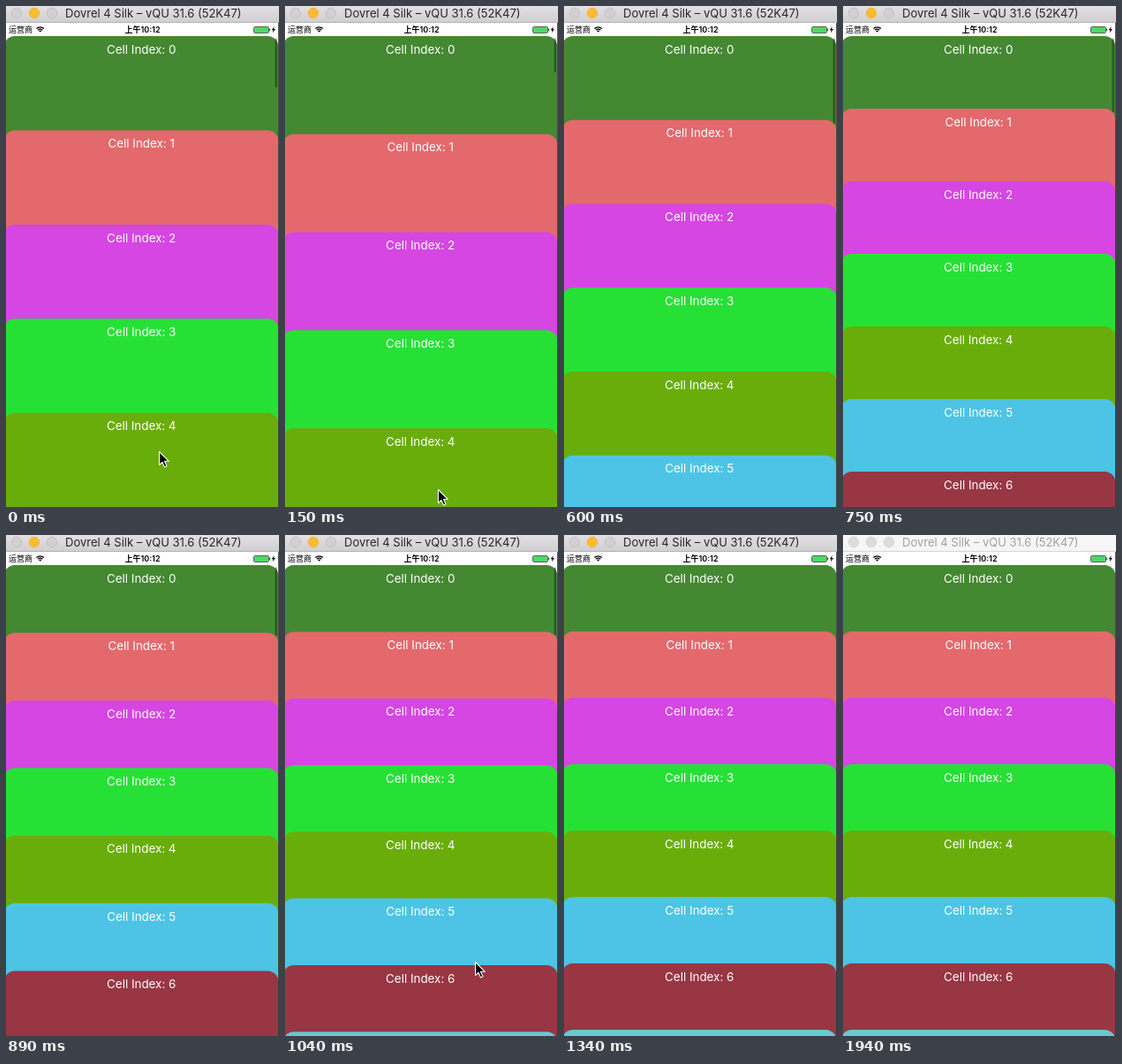
These frames come from a looping animation (309x566 px, 1.96 s). An HTML page with a canvas:

```html
<!DOCTYPE html>
<html lang="zh-CN">
<head>
<meta charset="utf-8">
<title>Stretching cells</title>
<style>
  html, body { margin: 0; width: 100%; height: 100%; overflow: hidden; background: #fff; }
  canvas { display: block; width: 309px; height: 566px; }
</style>
</head>
<body>
<canvas id="stage"></canvas>
<script>
const W = 309, H = 566, LOOP = 1960;
const TOP = 34.1, REST = 75, RADIUS = 12;
const SANS = 'Inter, "Noto Sans CJK SC", "Noto Sans CJK", sans-serif';
const COLORS = ['#448831', '#e3696d', '#d546e3', '#27e036', '#69ad0a', '#4dc4e5', '#983644', '#69c9d0'];

// Screen updates: time, cell spacing, scroll bar end, pointer tip
const STEPS = [
  { t: 0, gap: 106.4, bar: 92, tip: [173, 503] },
  { t: 150, gap: 110.7, bar: 75, tip: [173, 546] },
  { t: 300, gap: 113.7, bar: 63 },
  { t: 450, gap: 116.25, bar: 53 },
  { t: 600, gap: 94.75, bar: 133 },
  { t: 750, gap: 82, bar: 120 },
  { t: 890, gap: 76.4, bar: 114 },
  { t: 1040, gap: 75.3, bar: 113 },
  { t: 1190, gap: REST, bar: 113 },
  { t: 1340, gap: REST },
  { t: 1940, gap: REST, inactive: true }
];
STEPS[7].tip = [215, 482];

const canvas = document.getElementById('stage');
const ctx = canvas.getContext('2d');
const dpr = window.devicePixelRatio || 1;
canvas.width = W * dpr;
canvas.height = H * dpr;
ctx.scale(dpr, dpr);

function rect(x, y, w, h, fill) {
  ctx.fillStyle = fill;
  ctx.fillRect(x, y, w, h);
}

function round(x, y, w, h, r, fill) {
  ctx.beginPath();
  ctx.roundRect(x, y, w, h, r);
  ctx.fillStyle = fill;
  ctx.fill();
}

function poly(points, fill) {
  ctx.beginPath();
  points.forEach(([x, y]) => ctx.lineTo(x, y));
  ctx.closePath();
  ctx.fillStyle = fill;
  ctx.fill();
}

function text(str, x, y, font, fill, align = 'left') {
  ctx.font = `${font} ${SANS}`;
  ctx.textAlign = align;
  ctx.fillStyle = fill;
  ctx.fillText(str, x, y);
}

function drawTitleBar(inactive) {
  const bar = ctx.createLinearGradient(0, 0, 0, 18);
  bar.addColorStop(0, inactive ? '#f6f6f6' : '#e2e0e2');
  bar.addColorStop(1, inactive ? '#f6f6f6' : '#d1cfd1');
  rect(0, 0, W, 18, bar);
  rect(0, 18, W, 1, inactive ? '#d6d6d6' : '#b4b2b4');
  [12, 32, 52].forEach((x, i) => {
    const lit = i === 1 && !inactive;
    ctx.beginPath();
    ctx.arc(x, 8, 5.7, 0, Math.PI * 2);
    ctx.fillStyle = lit ? '#fdbc2e' : inactive ? '#dcdcdc' : '#d3d0d3';
    ctx.fill();
    ctx.lineWidth = 0.8;
    ctx.strokeStyle = lit ? '#f0b02b' : inactive ? '#d0d0d0' : '#bebbbe';
    ctx.stroke();
  });
  text('Dovrel 4 Silk – vQU 31.6 (52K47)', 67, 13, '13px', inactive ? '#a0a0a0' : '#262626');
}

function drawWifi(x, y) {
  const from = -Math.PI * 0.75, to = -Math.PI * 0.25;
  ctx.strokeStyle = '#000';
  ctx.lineWidth = 1.3;
  for (const r of [3.7, 6]) {
    ctx.beginPath();
    ctx.arc(x, y, r, from, to);
    ctx.stroke();
  }
  ctx.beginPath();
  ctx.moveTo(x, y);
  ctx.arc(x, y, 2.1, from, to);
  ctx.fillStyle = '#000';
  ctx.fill();
}

function drawStatus() {
  text('运营商', 3, 30, '9px', '#000');
  drawWifi(38.7, 29.8);
  text('上午10:12', 154.5, 30, '600 9px', '#000', 'center');
  ctx.beginPath();
  ctx.roundRect(280.5, 23.5, 17, 7, 1.4);
  ctx.lineWidth = 0.8;
  ctx.strokeStyle = '#333';
  ctx.stroke();
  round(281, 24, 16, 6, 0.8, '#4cd964');
  round(298.2, 25.6, 1, 2.4, 0.5, '#333');
  poly([[303.7, 23], [300.7, 27.2], [302.5, 27.2], [301.8, 30.4], [304.9, 26], [303, 26]], '#000');
}

function drawCells(gap) {
  COLORS.forEach((color, i) => {
    const y = TOP + i * gap;
    if (y > H) return;
    round(-2.2, y, 310.5, H - y + 20, RADIUS, color);
    text(`Cell Index: ${i}`, 153.2, y + 19.6, '13.4px', '#fff', 'center');
  });
}

function drawPointer([x, y]) {
  const arrow = [[0, 0], [0, 15], [3.4, 11.8], [5.9, 17.4], [8.4, 16.3], [6, 10.8], [10.8, 10.8]]
    .map(([dx, dy]) => [x + 0.5 + dx, y + 0.5 + dy]);
  poly(arrow, '#000');
  ctx.lineWidth = 1.1;
  ctx.lineJoin = 'round';
  ctx.strokeStyle = '#fff';
  ctx.stroke();
}

function draw(time) {
  const step = STEPS.findLast(s => s.t <= time);
  rect(0, 0, W, H, '#fff');
  drawStatus();
  drawCells(step.gap);
  if (step.bar) round(304.6, 36.5, 2.2, step.bar - 36.5, 1.1, 'rgba(0,0,0,.38)');
  rect(308, 19, 1, H, 'rgba(40,40,40,.8)');
  drawTitleBar(step.inactive);
  if (step.tip) drawPointer(step.tip);
}

const start = performance.now();
function tick() {
  draw((performance.now() - start) % LOOP);
  requestAnimationFrame(tick);
}
tick();
</script>
</body>
</html>
```
